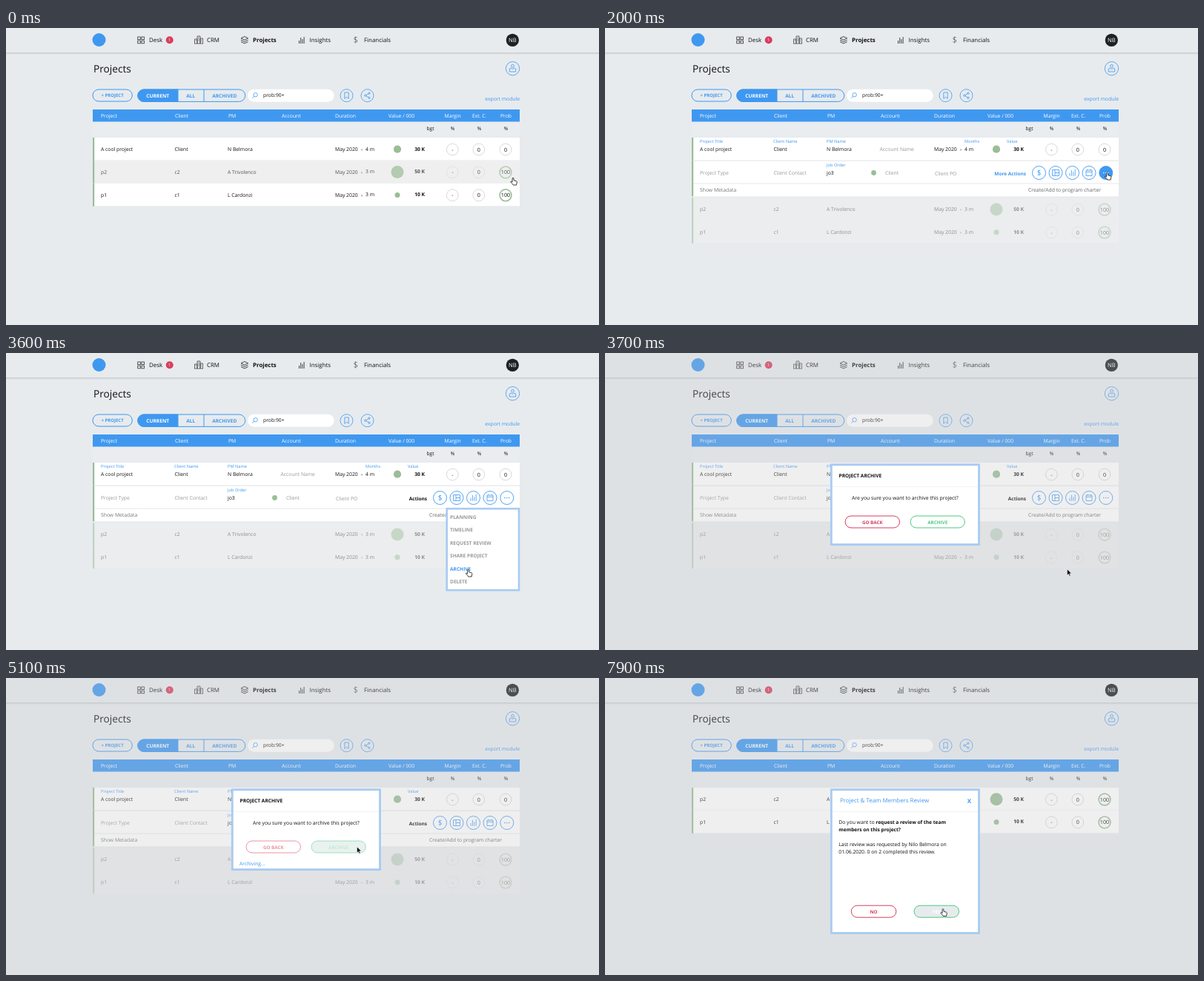
Write an HTML page that moves like this. It is 800 px wide and 401 px high and loops after 8 s.

```html
<!DOCTYPE html>
<html lang="en">
<head>
<meta charset="utf-8">
<title>Projects</title>
<style>
html, body { margin: 0; width: 100%; height: 100%; overflow: hidden; background: #e7ebee; }
svg { display: block; width: 800px; height: 401px; }
text { font-family: "Open Sans", "Noto Sans", sans-serif; white-space: pre; text-rendering: geometricPrecision; }
</style>
</head>
<body>
<svg id="stage" viewBox="0 0 800 401"></svg>
<script>
const LOOP = 8000;
const BLUE = '#3f98f0', GREEN = '#9bbd98', RED = '#d93d5e', MINT = '#4ccb7c';
const INK = '#111', GREY = '#999', FRAME = '#a8cbf2';

// Drawing helpers
const text = (x, y, s, fill = INK, size = 6.8, extra = '') =>
  `<text x="${x}" y="${y}" fill="${fill}" font-size="${size}" ${extra}>${s}</text>`;
const bold = (x, y, s, fill = INK, size = 6.6, extra = '') =>
  text(x, y, s, fill, size, 'font-weight="700" ' + extra);
const MID = 'text-anchor="middle"', END = 'text-anchor="end"';
const rect = (x, y, w, h, fill, extra = '') =>
  `<rect x="${x}" y="${y}" width="${w}" height="${h}" fill="${fill}" ${extra}/>`;
const circle = (x, y, r, fill = 'none', stroke = 'none', w = 1) =>
  `<circle cx="${x}" cy="${y}" r="${r}" fill="${fill}" stroke="${stroke}" stroke-width="${w}"/>`;
const line = (d, stroke = BLUE, w = .8, fill = 'none', extra = '') =>
  `<path d="${d}" fill="${fill}" stroke="${stroke}" stroke-width="${w}" ${extra}/>`;
const group = (s, opacity = 1, x = 0, y = 0) =>
  `<g opacity="${opacity}" transform="translate(${x} ${y})">${s}</g>`;
const pill = (x, y, w, h, stroke, fill = 'none') =>
  rect(x, y, w, h, fill, `rx="${h / 2}" stroke="${stroke}"`);

// Time helpers
const ramp = (t, a, b) => {
  const u = Math.min(1, Math.max(0, (t - a) / (b - a)));
  return u * u * (3 - 2 * u);
};

// Pointer moves: start, end, x, y
const START = [684, 202];
const MOVES = [
  [300, 800, 688, 172],
  [1200, 1700, 677.5, 195],
  [2250, 2750, 644.5, 264],
  [2900, 3400, 623.5, 292],
  [3800, 4500, 473.5, 228],
  [6700, 7350, 456, 311.5]
];
function pointerAt(t) {
  let [x, y] = START;
  for (const [a, b, tx, ty] of MOVES) {
    const k = ramp(t, a, b);
    x += (tx - x) * k;
    y += (ty - y) * k;
  }
  return [x, y];
}

function navBar() {
  const dark = '#333';
  let s = `<defs><linearGradient id="shade" x2="0" y2="1">
    <stop stop-color="#c6c9cc"/><stop offset="1" stop-color="#e7ebee"/></linearGradient></defs>`;
  s += rect(0, 0, 800, 401, '#e7ebee') + rect(0, 33, 800, 3, 'url(#shade)');
  s += circle(125.5, 16, 9, BLUE);
  for (const x of [177.7, 182.9]) for (const y of [12, 17.2])
    s += rect(x, y, 3.6, 3.6, 'none', `stroke="${dark}" stroke-width=".8"`);
  s += text(193, 19.2, 'Desk', INK, 7.9) + circle(220.7, 16.2, 5, RED) + text(220.7, 18.2, '1', '#fff', 5.5, MID);
  s += line('M254.5 21v-6h3.5v6M258 21v-10h4v10M262 21v-7h3.5v7M254 21h12M259.3 13h1.4m-1.4 2h1.4m-1.4 2h1.4m-5 0h1m6.3-1h1m-1 2h1', dark, .7);
  s += text(271, 19.2, 'CRM', INK, 7.9);
  s += line('M317 13.8l4.8-2.3 4.8 2.3-4.8 2.3zM317 16.2l4.8 2.3 4.8-2.3M317 18.6l4.8 2.3 4.8-2.3', dark, .9);
  s += bold(333, 19.2, 'Projects', INK, 7.9);
  s += line('M395.5 21v-4m2.2 4v-8m2.2 8v-6m2.2 6v-9', dark, .9);
  s += text(409.5, 19.2, 'Insights', INK, 7.9);
  s += text(471.7, 20.4, '$', dark, 11.5, MID + ' font-weight="300"');
  s += text(483, 19.2, 'Financials', INK, 7.9);
  return s + circle(683.3, 16.4, 8.6, '#1d2124') + text(683.3, 19.1, 'NB', '#fff', 7.6, MID);
}

function toolBar() {
  let s = text(118, 59.8, 'Projects', INK, 13.7);
  s += circle(683.5, 54.7, 9.2, 'none', BLUE, .8) + circle(683.5, 51.2, 1.9, 'none', BLUE, .8);
  s += line('M679.3 55v4h8.4v-4l-2.6-.8-1.6 1.4-1.6-1.4z');
  s += pill(117, 83, 53.3, 16, BLUE) + bold(143.6, 93.3, '+ PROJECT', BLUE, 6, MID);
  s += pill(177.7, 83, 145, 16.4, BLUE);
  s += line('M232 83H186a8.2 8.2 0 0 0 0 16.4H232z', BLUE, 1, BLUE) + line('M267 83v16.4', BLUE, 1);
  s += bold(204.7, 93.5, 'CURRENT', '#fff', 6.6, MID) + bold(249.3, 93.5, 'ALL', BLUE, 6.6, MID);
  s += bold(294.8, 93.5, 'ARCHIVED', BLUE, 6.6, MID);
  s += rect(326, 82.7, 116.6, 17, '#fff', 'rx="8.5"');
  s += circle(336.6, 90.2, 2.7, 'none', BLUE, .8) + line('M334.7 92.2l-2.5 2.6') + text(347, 93.4, 'prob:90+');
  s += circle(459.5, 91.2, 8.5, 'none', BLUE, .8) + line('M456.8 87h5.4v8.4l-2.7-2.2-2.7 2.2z');
  s += circle(487.5, 91.2, 8.5, 'none', BLUE, .8) + line('M489.7 88.3l-4.7 2.9 4.7 2.9');
  for (const [x, y] of [[490, 88.1], [484.8, 91.2], [490, 94.3]]) s += circle(x, y, 1.2, '#e7ebee', BLUE, .8);
  return s + text(693, 98, 'export module', BLUE, 6.8, END);
}

function tableHead() {
  const cols = [['Project', 128], ['Client', 228], ['PM', 300], ['Account', 372], ['Duration', 444],
    ['Value / 000', 516], ['Margin', 591.5], ['Ext. C.', 629], ['Prob', 667]];
  let s = rect(117, 110, 576, 16.7, BLUE) + rect(117, 126.7, 576, 20, '#e9edef');
  for (const [name, x] of cols) s += text(x, 120.6, name, '#fff');
  s += text(572.5, 138, 'bgt', INK, 6.6, MID);
  for (const x of [602.5, 638.5, 674.5]) s += text(x, 138, '%', INK, 6.6, MID);
  return s;
}

const PROJECTS = [
  { name: 'A cool project', client: 'Client', pm: 'N Belmora', months: 4, value: 30, dot: 5.1, prob: 0 },
  { name: 'p2', client: 'c2', pm: 'A Trivolenco', months: 3, value: 50, dot: 8.5, prob: 100 },
  { name: 'p1', client: 'c1', pm: 'L Cardonzi', months: 3, value: 10, dot: 3.5, prob: 100 }
];

// One table line whose top edge is at y
function row(p, y, { hover = false, faded = 0 } = {}) {
  const fill = hover ? '#efefef' : faded ? '#efefef' : '#fff';
  let s = text(128, 17.9, p.name) + text(227.5, 17.9, p.client) + text(299, 17.9, p.pm);
  s += text(444, 18.2, 'May 2020') + text(478.7, 17.8, '&gt;', INK, 4.5) + text(485, 17.6, p.months + ' m');
  s += circle(528, 15.7, p.dot, GREEN) + bold(565, 17.6, p.value + ' K', INK, 6.7, END);
  [['-', 602.3], [0, 637.8], [p.prob, 674]].forEach(([v, x]) => {
    const full = v === 100;
    s += circle(x, 16, 7.9, '#fff', full ? GREEN : '#d9d9d9', full ? 1.6 : 1);
    s += text(x, 18.6, v, INK, 7.2, MID);
  });
  if (hover || faded) s = s.replaceAll('fill="#fff"', 'fill="none"');
  const back = rect(117, 0, 576, 30.4, fill) + rect(117, 0, 2.2, 30.9, GREEN);
  return group(back + group(s, hover ? .7 : 1 - .15 * faded), 1 - .5 * faded, 0, y);
}

function actionButtons(hover) {
  let s = '';
  [585.5, 608, 630.5, 653, 675.8].forEach((x, i) => {
    const on = hover && i === 4;
    s += circle(x, 195.5, 9, on ? BLUE : '#fff', BLUE, .9);
  });
  s += text(585.5, 199.2, '$', BLUE, 10, MID);
  s += line('M603.5 191.5h9v8h-9zM607 191.5v8M607 195.5h5.5');
  s += line('M627 199.8v-4m2.4 4v-8m2.4 8v-5.5m2.4 5.5v-9');
  s += line('M649 192h8v7.5h-8zM649 194.3h8M651 190.7v1.5M655 190.7v1.5');
  for (const d of [-3, 0, 3]) s += circle(675.8 + d, 195.5, .8, hover ? '#fff' : BLUE);
  return s;
}

function details(open, hoverMore) {
  const label = (x, y, s) => text(x, y, s, BLUE, 5.7);
  let s = label(128, 155.4, 'Project Title') + label(227, 155.2, 'Client Name') + label(299, 155.2, 'PM Name');
  s += label(485, 155.2, 'Months') + label(542, 155.2, 'Value');
  s += text(370.5, 165.9, 'Account Name', GREY);
  s += line('M119 179.2H693M119 210H693', '#dfe1e3', .8);
  s += text(128, 198.4, 'Project Type', GREY) + text(227.5, 198, 'Client Contact', GREY);
  s += label(299, 187.4, 'Job Order') + text(299, 197.8, 'jo3');
  s += circle(362.5, 195.5, 3.4, GREEN) + text(378, 198.3, 'Client', GREY) + text(445, 198.8, 'Client PO', GREY);
  s += bold(568, 198.7, hoverMore ? 'More Actions' : 'Actions', hoverMore ? BLUE : INK, 6.5, END);
  s += actionButtons(hoverMore);
  s += text(128, 220.8, 'Show Metadata', '#777') + text(571, 220.8, 'Create/Add to program charter', '#666');
  return rect(117, 178.4, 576, 49 * open, '#fff') + rect(117, 178.4, 2.2, 49 * open, GREEN) + group(s, open);
}

function menu(y) {
  const hot = Math.floor((y - 212.2) / 17.5);
  let s = rect(594.7, 210.2, 97.3, 110, '#fff', `stroke="${FRAME}" stroke-width="2.6"`);
  ['PLANNING', 'TIMELINE', 'REQUEST REVIEW', 'SHARE PROJECT', 'ARCHIVE', 'DELETE'].forEach((item, i) => {
    s += bold(599, 223.5 + 17.5 * i, item, i === hot ? BLUE : GREY);
  });
  return s;
}

function dialog(h, body) {
  return rect(0, 0, 800, 401, '#c4c6c8', 'opacity=".28"') +
    rect(305.3, 150.8, 199.2, h, '#fff', `stroke="${FRAME}" stroke-width="2.8"`) +
    line('M307 180.5H503', '#f0f0f0', .8) + body;
}

function button(x, y, w, name, color, hover) {
  return pill(x, y, w, 16, color, hover ? '#e7ebee' : '#fff') +
    bold(x + w / 2, y + 10.5, name, hover ? '#fff' : color, 6.3, MID);
}

function archiveDialog(hover, busy) {
  let s = bold(315.5, 168.3, 'PROJECT ARCHIVE') + text(333, 197.8, 'Are you sure you want to archive this project?');
  let b = button(324, 220, 73.5, 'GO BACK', RED, false);
  if (busy) b += pill(412, 220, 73.3, 16, MINT, '#d8e6e6') + bold(448.6, 230.5, 'ARCHIVE', '#8ee0a8', 6.3, MID);
  else b += button(412, 220, 73.3, 'ARCHIVE', MINT, hover);
  s += group(b, busy ? .55 : 1);
  if (busy) s += text(315, 253, 'Archiving...', BLUE);
  return dialog(107.8, s);
}

function reviewDialog(hover) {
  let s = text(317, 168.4, 'Project &amp; Team Members Review', BLUE, 7.9) + bold(491.5, 168.6, 'X', BLUE, 8, MID);
  s += text(315.3, 196.8, 'Do you want to <tspan font-weight="700" font-size="6.6">request a review of the team</tspan>');
  s += bold(315.3, 206.8, 'members on this project?');
  s += text(315.3, 227.2, 'Last review was requested by Nilo Belmora on');
  s += text(315.3, 237.2, '01.06.2020. 0 on 2 completed this review.');
  s += button(332.3, 307.2, 60.5, 'NO', RED, false) + button(417, 307.2, 60.5, 'YES', MINT, hover);
  return dialog(193.6, s);
}

function pointer(x, y, hand) {
  return group(hand
    ? line('M-.9 .8q.9-1.4 1.8 0l.2 3 3.4 .9q1 .4 .8 1.6l-.6 2.7v1h-4.6l-.6-1.3-2.7-2.8q.2-1.3 1.4-.6l.9 .7z', '#111', .8, '#fff')
    : line('M0 0v8l1.9-1.7 1.3 2.9 1.3-.6-1.3-2.8h2.6z', '#fff', .5, '#000'), 1, x, y);
}

function scene(t) {
  const [x, y] = pointerAt(t);
  const open = ramp(t, 1000, 1250);
  const asking = t >= 3650, busy = t >= 4900, archived = t >= 5700;
  let s = fixed;
  if (archived) {
    s += row(PROJECTS[1], 148) + row(PROJECTS[2], 178.9);
  } else {
    PROJECTS.forEach((p, i) => {
      const top = 148 + 30.9 * i;
      const hover = !open && y >= top && y < top + 30.9;
      s += row(p, i ? top + 50.3 * open : top, { hover, faded: i ? open : 0 });
    });
    if (open) s += details(open, !asking && Math.hypot(x - 675.8, y - 195.5) < 9);
    if (t >= 2100 && !asking) s += menu(y);
  }
  const onArchive = x < 485 && y > 220 && y < 236;
  const onYes = y > 307;
  if (archived) s += reviewDialog(onYes);
  else if (asking) s += archiveDialog(onArchive, busy);
  const hand = !asking || (!busy && onArchive) || (archived && onYes);
  return s + pointer(x, y, hand);
}

const stage = document.getElementById('stage');
const fixed = navBar() + toolBar() + tableHead();
const began = performance.now();
let shown = '';
function draw() {
  const next = scene((performance.now() - began) % LOOP);
  if (next !== shown) stage.innerHTML = shown = next;
  requestAnimationFrame(draw);
}
draw();
</script>
</body>
</html>
```
